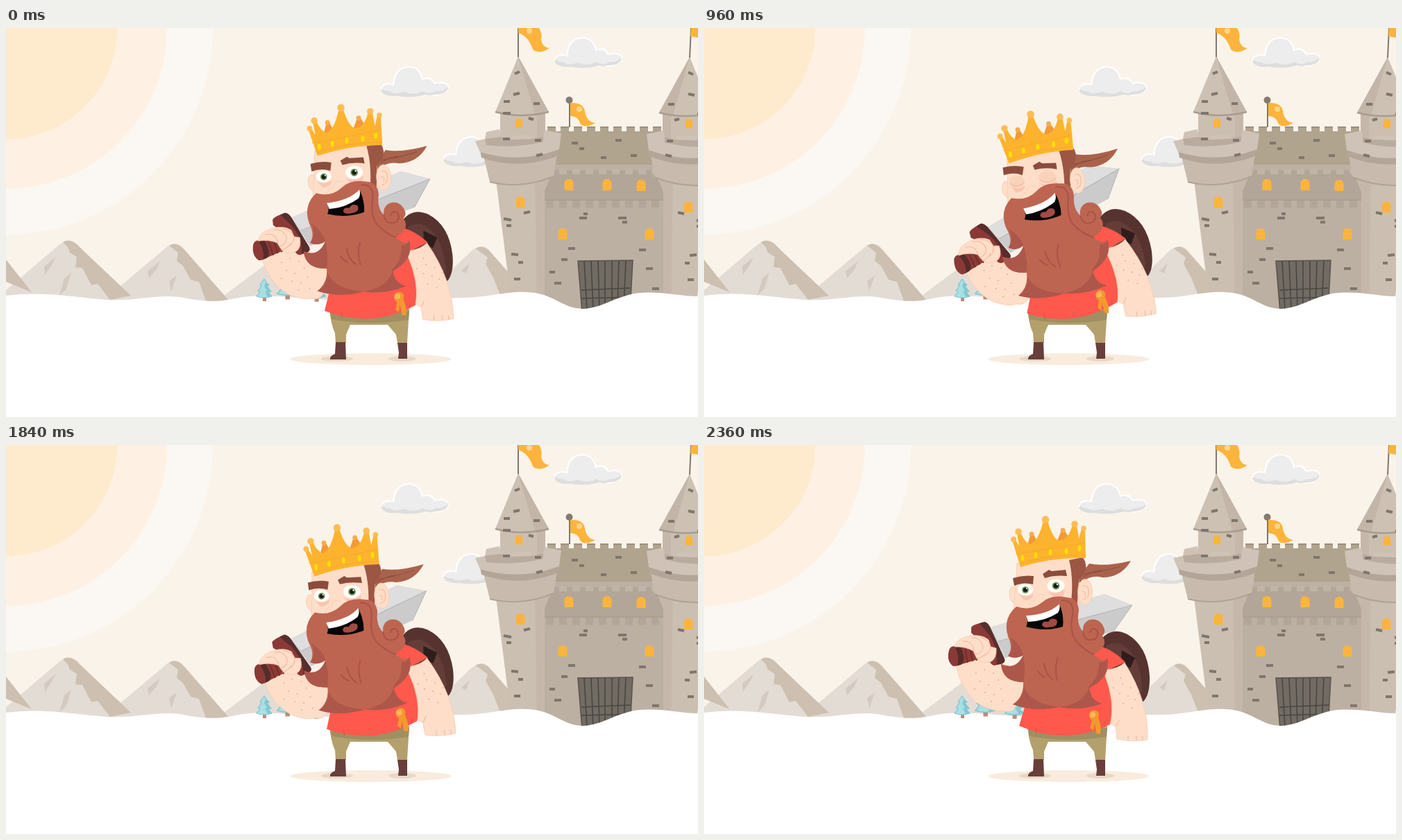
Write an HTML page that moves like this. It is 997 by 561 pixels and loops after 3.44 s.

```html
<!DOCTYPE html>
<html lang="en">
<head>
<meta charset="utf-8">
<title>King by the castle</title>
<style>
html, body { margin: 0; width: 100%; height: 100%; overflow: hidden; background: #fff; }
svg { display: block; width: 100%; height: 100%; }
.skin { fill: #fedec8; stroke: #f9c9b0; stroke-width: .8; }
.crease { fill: none; stroke: #f3b49b; stroke-width: 1; stroke-linecap: round; }
.lock { fill: none; stroke: #a9534a; stroke-width: 2; stroke-linecap: round; }
.freckles { fill: none; stroke: #e3ae93; stroke-width: 2; stroke-linecap: round; }
.bricks { fill: none; stroke: #7f766c; stroke-width: 4; }
.glow { fill: #fdb43c; }
.pole { stroke: #81776d; stroke-width: 2; }
</style>
</head>
<body>
<svg viewBox="0 0 997 561" preserveAspectRatio="none">
<defs>
  <g id="cloud">
    <path fill="#fff" d="M0 33Q5 21 18 26Q20 2 40 0Q58 0 62 18Q73 12 79 24Q96 20 99 29Q100 36 92 39Q82 45 70 41Q45 47 24 43Q5 45 0 33Z"/>
    <path fill="#dedede" d="M1 35Q8 26 20 29L85 27Q97 27 98 32Q94 41 78 41Q72 43 66 41Q45 47 25 43Q6 45 1 35Z"/>
    <path fill="#eeedee" d="M2 32Q8 24 20 28Q22 3 41 2Q57 2 60 20Q72 15 78 26Q94 22 98 30Q91 37 80 36Q72 42 61 36Q48 43 35 37Q20 42 14 36Q7 37 2 32Z"/>
  </g>
  <g id="tree">
    <path fill="#b98b7a" d="M-2 25h5v7h-5z"/>
    <path fill="#a9e0e4" stroke="#84c5d0" stroke-width="1.2" stroke-linejoin="round" d="M0 0Q3 6 7 9L4 10Q7 15 10 18L6 19Q9 23 11 25Q0 29-11 25Q-8 22-6 18L-9 17Q-6 14-4 9L-6 8Z"/>
    <path fill="#82c8d2" d="M2 5L7 9L4 10L10 18L6 19L11 25L5 26L1 18L4 17L0 10Z"/>
  </g>
  <g id="window"><path class="glow" d="M-6.5 8V-2Q-6-8 0-8Q6-8 6.5-2V8Z"/></g>
  <g id="tower">
    <path fill="#cbbfb2" d="M712 116H777V165H712ZM705 212L788 205L776 235V410H730Z"/>
    <path fill="#c6b7ab" d="M765 116H777V165H765ZM762 212L788 205L776 235V410H765Z"/>
    <path fill="#cdc1b4" d="M738 41L782 121Q744 130 705 121Z"/>
    <path fill="#c3b5a8" d="M738 41L782 121Q774 126 762 125Z"/>
    <path fill="none" stroke="#a99c8e" stroke-width="2.500" d="M705 121Q744 131 782 121"/>
    <path fill="#c8bbae" d="M683 165L797 163L789 214Q742 233 697 222Z"/>
    <path fill="#b3a598" d="M683 176Q740 198 797 174L796 184Q740 206 685 187Z"/>
    <path fill="#cfc3b7" d="M676 163L690 160L692 150L711 146L713 157L728 161L730 155L757 154L758 160L774 156L776 147L800 152L797 175Q740 196 683 179Z"/>
    <path fill="#b9ac9e" d="M690 160L713 157L728 161L758 160L774 156V164Q735 174 692 169Z"/>
    <path fill="none" stroke="#b0a294" stroke-width="2" d="M697 222Q742 233 789 214"/>
    <path class="bricks" d="M733 66l7-3M731 96l9-2M717 106h9M760 109h9M716 123h11M753 130l7 2M716 160h10M762 162h9M764 184l9-2M717 275l11 2M721 285h7M746 267l9-2M728 326l10 1M738 338h7M732 362h9"/>
    <use href="#window" transform="translate(739 137) scale(.8)"/>
  </g>
</defs>

<path fill="#faf3e9" d="M0 0H997V561H0Z"/>
<circle r="298" fill="#fbf8f3"/><circle r="232" fill="#fef1e3"/><circle r="160.500" fill="#feebce"/>
<use href="#cloud" x="539" y="55"/><use href="#cloud" x="789" y="13"/><use href="#cloud" x="629" y="156"/>

<g id="mountains">
  <path fill="#e3dcd5" d="M0 378L75 314Q91 300 104 313L167 392H0ZM158 378L229 318Q244 304 256 318L322 394H150ZM303 394L386 332L430 318L500 394ZM620 394V370L670 322Q685 309 696 320L735 392Z"/>
  <path fill="#cdc0b0" d="M0 334L37 381L0 366ZM82 309Q92 302 105 315L180 386L150 392L132 369L123 371L110 346L100 345L102 330L92 324L89 316ZM235 314Q245 307 257 320L322 394H288L278 366L266 363L255 343L246 336L248 324ZM677 318Q686 311 698 323L735 365V390L713 388L702 360L698 353L691 340L694 331Z"/>
  <path fill="#d4cac0" d="M55 344L72 330L65 343L56 356ZM84 361L94 353L87 376L77 386ZM204 351L222 336L217 348L206 361ZM235 365L246 357L238 380ZM656 350L668 339L663 354Z"/>
</g>

<g id="castle">
  <path fill="#b0a48f" d="M776 149H952V200H776Z"/>
  <path fill="none" stroke="#b0a48f" stroke-width="7" stroke-dasharray="12 7" d="M780 146H952"/>
  <path fill="none" stroke="#9c907e" stroke-width="2" stroke-dasharray="12 7" d="M780 143H952"/>
  <path fill="#bcb0a3" d="M775 196H950V410H775Z"/>
  <path fill="#b2a698" d="M775 205H950V249H775Z"/>
  <path fill="none" stroke="#b2a698" stroke-width="11" stroke-dasharray="11 8" d="M778 254H950"/>
  <path fill="none" stroke="#c0b4a7" stroke-width="8" stroke-dasharray="11 8" d="M778 207H950"/>
  <path fill="none" stroke="#a59888" d="M775 196H950M775 248H950"/>
  <path class="bricks" d="M815 166h9M826 174h7M878 162h9M900 184h9M857 187h8M826 274h11M832 268h6M882 274h12M888 280h7M810 318h10M800 334h9M912 320h10M922 347h10M783 352h8M790 368h10M931 376h10"/>
  <path fill="#716b63" stroke="#59544e" stroke-width="1.5" d="M824 336L903 335L899 410H830Z"/>
  <path fill="none" stroke="#494641" stroke-width="1.6" d="M833 336l4 70M843 336l3 70M853 336l2 70M863 336v70M873 336v70M883 336l-2 70M893 336l-3 70M829 378l71-3M829 390l71-2"/>
  <use href="#window" x="811" y="226"/><use href="#window" x="866" y="226"/><use href="#window" x="915" y="227"/>
  <use href="#window" x="802" y="297"/><use href="#window" x="927" y="297"/>
  <use href="#tower"/><use href="#window" x="741" y="251"/>
  <use href="#tower" transform="translate(1723 1) scale(-1 1)"/><use href="#window" x="983" y="258"/>
  <path class="pole" d="M738 0V42M812 104V143M987 0L985 43"/>
  <circle cx="811.500" cy="104" r="5" fill="#857a6f"/>
  <path class="glow" d="M738 0H768Q773 8 771 17Q773 28 783 29Q768 39 759 31Q753 12 738 7ZM813 108Q832 107 834 120Q836 135 849 137Q832 146 827 137Q824 127 813 127ZM987 0H997V14L986 12Z"/>
  <circle cx="754" cy="4" r="4" fill="#ffd58b"/><circle cx="826" cy="117" r="4" fill="#ffd58b"/>
</g>

<path fill="#fff" d="M0 386C55 379 95 388 145 392C190 394 215 384 250 388C280 394 300 396 325 391C370 381 405 390 470 392C580 394 615 389 660 389C700 388 720 379 752 381C790 383 800 404 831 405C858 404 875 389 905 383C940 378 970 387 997 387V561H0Z"/>
<use href="#tree" x="372" y="362"/>
<use href="#tree" transform="translate(405 353) scale(1.3 1.2)"/>
<use href="#tree" transform="translate(447 358) scale(1.2 1.15)"/>
<ellipse cx="525.500" cy="477.500" rx="116" ry="8.500" fill="#f9ecdd"/>
<ellipse cx="477" cy="477" rx="23" ry="4" fill="#e8d8c9"/><ellipse cx="571" cy="477" rx="20" ry="4" fill="#e8d8c9"/>

<g id="legs">
  <path fill="#b3a06d" d="M466 405H581L579 437L578 454H564L562 442L550 428H496L490 442V454H475L474 440Q468 428 466 405Z"/>
  <path fill="#9f8f62" d="M467 408H581L580 421Q520 430 469 420Z"/>
  <path fill="#683f3a" d="M475 453H489L490 478H467Q466 473 474 470ZM564 454H578V477H565L566 468Z"/>
</g>

<g data-part="sword">
  <path fill="#cbcbcb" d="M412 263L577 215L617 231L590 269L434 307Z"/>
  <path fill="#dedede" d="M412 263L577 215L617 231L565 244L424 283Z"/>
  <path fill="none" stroke="#b5b5b5" d="M424 283L617 231L590 269"/>
</g>

<g data-part="body">
  <path fill="#573330" d="M570 283Q586 261 610 273Q639 290 642 333Q643 359 633 370L570 340Z"/>
  <path fill="#643d38" d="M579 290Q598 278 616 300Q632 322 631 357L580 335Z"/>
  <path fill="#2f1d1b" d="M602 296L621 307L614 322L601 313Z"/>
  <path fill="#ff584c" d="M470 300L545 288Q578 284 607 313L583 324Q592 372 585 403Q520 434 454 405L462 378Q448 358 452 334Z"/>
  <path fill="none" stroke="#e44a42" d="M478 407l1 9M578 398l-2 8M585 326Q598 321 607 313"/>
  <path class="skin" d="M581 324Q598 322 606 314Q641 370 639 425Q617 429 595 424L593 406L586 402Q592 370 578 333Z"/>
  <path class="crease" d="M611 419v7M623 419v7M594 405l4-8M632 420v6"/>
  <path class="freckles" d="M590 350h0M603 345h0M615 350h0M599 358h0M611 362h0M621 367h0M617 379h0M604 373h0M626 358h0M600 336h0"/>
  <path fill="#f29a2e" d="M555 388Q558 381 565 383Q571 386 568 393Q573 406 571 417L565 416L563 401L561 412L556 408L559 397Q554 394 555 388Z"/>
  <circle cx="560" cy="389" r="4" fill="#fdb75b"/>
</g>

<g data-part="forearm">
  <path class="skin" d="M363 316Q370 356 398 375Q420 386 431 383Q445 388 450 375L455 365L466 365V325L430 316L410 305Z"/>
  <path class="freckles" d="M392 329h0M404 324h0M417 329h0M398 341h0M410 346h0M424 339h0M390 352h0M405 357h0M418 360h0M428 352h0M414 370h0M430 369h0"/>
</g>

<g data-part="sword">
  <path fill="#8e3a36" d="M362 292L414 279L419 302L368 317Z"/>
  <path fill="none" stroke="#6a2b2b" stroke-width="1.500" d="M376 294l4 20M383 292l4 20M390 291l3 20"/>
  <path fill="#8b3936" d="M353 296Q355 289 363 290L372 314Q369 319 359 319Q349 312 353 296Z"/>
  <path fill="#552c2a" d="M361 290Q368 288 371 294Q378 312 370 317L365 318Q369 305 361 290Z"/>
  <path fill="#8b3936" d="M385 263Q387 259 402 256Q408 256 411 262L433 310Q434 314 428 315L419 318Q414 318 411 311Q408 289 385 271Z"/>
  <path fill="#572e2c" d="M397 257L404 255Q409 256 412 262L433 308Q435 314 428 316L421 317Q425 295 411 274Z"/>
  <path class="skin" d="M361 291Q364 278 384 275Q400 273 410 281L413 291L421 293Q422 309 412 313Q398 316 392 306L388 297Q376 290 361 291Z"/>
  <path class="crease" d="M373 283Q387 281 389 297M386 278Q399 277 402 291Q401 301 390 302M398 277Q411 281 413 291Q412 302 400 305M392 308Q400 307 406 301"/>
</g>

<g data-part="ponytail">
  <path fill="#a9624c" d="M536 184Q550 180 555 171Q578 176 615 167Q601 191 574 191Q558 187 546 197L536 200Z"/>
  <path fill="none" stroke="#8d4c3e" d="M545 186Q574 183 600 175M547 190Q560 181 574 181"/>
</g>

<g data-part="head">
  <ellipse class="skin" cx="447" cy="216" rx="7" ry="12" transform="rotate(-8 447 216)"/>
  <path class="skin" d="M451 170L540 160V240H446Q447 221 449 204Z"/>
  <path fill="#9c5644" d="M526 166L546 162Q554 174 547 186L540 195L537 242H527Q534 197 526 166Z"/>
  <ellipse class="skin" cx="549" cy="212" rx="10.500" ry="18.500"/>
  <path class="crease" d="M546 203Q556 201 554 215Q553 222 546 223M546 211q5 0 3 7"/>
</g>

<g data-part="face">
  <path fill="#f8b9a5" opacity=".65" d="M453 214Q462 222 475 214Q473 225 461 224ZM493 210Q506 218 520 208Q520 221 506 221Z"/>
  <g id="eyes">
    <ellipse cx="463" cy="208.500" rx="11" ry="8.500" fill="#fff"/><ellipse cx="507" cy="203" rx="12.500" ry="9.500" fill="#fff"/>
    <circle cx="463" cy="209" r="4.800" fill="#668b47"/><circle cx="507" cy="203" r="5.300" fill="#668b47"/>
    <circle cx="463" cy="209" r="3" fill="#171b14"/><circle cx="507" cy="203" r="3.300" fill="#171b14"/>
    <circle cx="465" cy="207" r="1" fill="#fff"/><circle cx="509" cy="201" r="1.200" fill="#fff"/>
  </g>
  <g id="lids">
    <ellipse cx="463" cy="208.500" rx="11" ry="8.500" fill="#f9d2ba"/><ellipse cx="507" cy="203" rx="12.500" ry="9.500" fill="#f9d2ba"/>
    <path class="crease" d="M453 211Q463 219 473 211M495 206Q507 215 519 205"/>
  </g>
  <path class="skin" d="M490 216Q477 213 477 224Q468 226 468 234L489 238Q499 232 491 221"/>
</g>
<path data-part="brows" fill="#8c4c3c" d="M445 192Q460 187 475 189L474 201Q460 197 447 203ZM488 186L497 180L501 182L521 180L523 189Q506 187 491 192Z"/>

<g data-part="crown">
  <path fill="#f19a37" d="M465 148L470 130L475 129L483 145ZM507 143L515 123L520 124L529 139Z"/>
  <circle cx="472" cy="128.500" r="3.500" fill="#f6ac50"/><circle cx="517" cy="123" r="3.500" fill="#f6ac50"/>
  <path fill="#fdb32e" d="M444 137L448 135L454 146L451 127L456 125Q461 140 470 143Q482 139 489 109L495 109Q502 135 512 138Q525 137 531 115L537 115L540 135L544 121L549 121L550 163Q502 162 456 176Z"/>
  <path fill="none" stroke="#f8a72b" d="M449 157Q499 150 549 141M455 171Q502 157 550 159"/>
  <g fill="#fdbd55"><circle cx="446" cy="136" r="4"/><circle cx="453" cy="125" r="4.800"/><circle cx="492" cy="107.500" r="5.300"/><circle cx="534" cy="114" r="4.800"/><circle cx="547" cy="120" r="3.800"/></g>
  <g fill="#ffde0a" stroke="#f8a92a" stroke-width=".6"><ellipse cx="459" cy="163" rx="3" ry="5"/><ellipse cx="478" cy="159" rx="3" ry="5"/><ellipse cx="499" cy="155" rx="3" ry="5"/><ellipse cx="522" cy="153" rx="3" ry="5"/><ellipse cx="541" cy="149" rx="3" ry="5"/></g>
</g>

<g data-part="beard">
  <path fill="#bd6550" d="M450 233Q471 240 487 227Q500 215 524 220Q539 221 540 239Q536 258 546 269C544 249 568 246 575 261Q580 270 574 275Q584 291 561 302Q577 316 581 307Q585 330 567 343Q563 348 555 350Q557 368 573 373Q543 384 511 378Q476 386 445 374Q461 363 460 342Q430 342 428 316Q449 326 460 303Q448 310 438 304Q446 293 438 276Q430 250 450 233Z"/>
  <path fill="#ad574b" d="M438 304Q448 292 441 276Q458 290 460 303Q448 310 438 304ZM428 316Q449 326 460 303Q464 325 460 342Q430 342 428 316ZM445 374Q460 366 461 348Q468 372 511 378Q476 386 445 374ZM511 378Q546 374 555 350Q557 368 573 373Q543 384 511 378ZM555 350Q569 336 569 313Q577 315 581 307Q585 330 567 343Z"/>
  <path class="lock" d="M516 224Q534 224 531 245Q525 274 540 287Q550 297 561 302M546 269Q548 285 563 280Q570 275 566 267Q559 262 556 270M490 315Q492 331 502 338M510 307Q504 321 509 339M481 326Q486 333 491 335M555 350L563 340"/>
</g>
<g data-part="mouth">
  <path fill="#080606" d="M464 246Q500 245 512 229Q519 246 517 262Q492 270 464 262Q468 254 464 246Z"/>
  <path fill="#fff" d="M464 246Q498 244 512 229Q514 236 510 242Q492 254 467 255Z"/>
  <path fill="#a14b43" d="M487 259Q488 253 496 255Q500 248 508 252Q512 262 497 263Q488 264 487 259Z"/>
</g>
</svg>

<script>
const LOOP = 3440, STEP = 40;
// Full lean of each part: angle, pivot, shift.
const leans = {
  sword: [-15.2, 363, 304, 9, 36],
  body: [-6.2, 522, 302, 0, 0],
  forearm: [-8, 390, 345, 14, 21],
  ponytail: [-4, 615, 168, -19, 7],
  head: [-5, 520, 200, -12, 10.5],
  face: [-1, 485, 206, -12, 12.5],
  brows: [4, 485, 191, -14.5, 12],
  crown: [-4, 492, 107, -21.5, 17],
  beard: [-6.2, 522, 302, 0, 4],
  mouth: [-7, 491, 248, -4, 11],
};
const parts = [...document.querySelectorAll('[data-part]')];
const eyes = document.getElementById('eyes');
const lids = document.getElementById('lids');

function leanAt(t) {
  const steps = from => Math.floor((t - from) / STEP);
  if (t < 200) return 0.44 + 0.56 * steps(0) / 5;
  if (t < 1760) return 1;
  return Math.max(0, 1 - (steps(1760) + 1) / 10);
}

function draw(now) {
  const t = now % LOOP;
  const lean = leanAt(t);
  for (const part of parts) {
    const [angle, x, y, dx, dy] = leans[part.dataset.part];
    part.setAttribute('transform',
      `translate(${dx * lean} ${dy * lean}) rotate(${angle * lean} ${x} ${y})`);
  }
  const blink = (t >= 960 && t < 1000) || (t >= 2280 && t < 2360);
  eyes.style.display = blink ? 'none' : '';
  lids.style.display = blink ? '' : 'none';
}

const start = performance.now();
function tick() {
  draw(performance.now() - start);
  requestAnimationFrame(tick);
}
tick();
</script>
</body>
</html>
```
